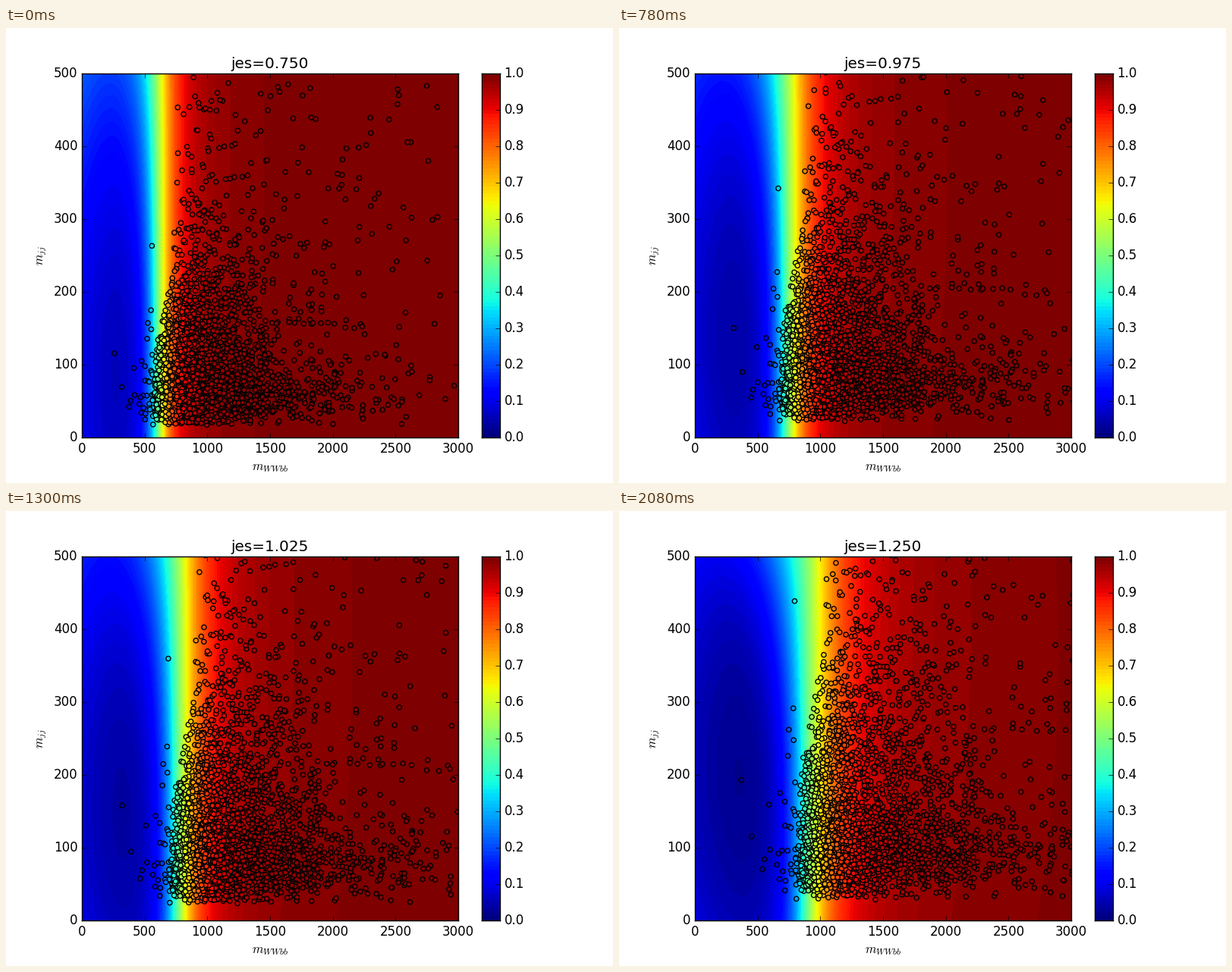
Recreate the animation shown at these times as a matplotlib script. Size 800 by 600 pixels, loop 2340 ms.

```python
import numpy as np
import matplotlib.pyplot as plt
from matplotlib.animation import FuncAnimation

plt.rcParams.update({
    "font.family": "DejaVu Sans", "font.size": 12,
    "mathtext.fontset": "cm", "text.hinting": "force_autohint",
    "axes.linewidth": 1.0, "axes.axisbelow": False,
    "axes.titlesize": 14.4, "axes.titlepad": 5, "axes.labelpad": 5,
    "ytick.alignment": "center",
})
for side in ("xtick", "ytick"):
    plt.rcParams.update({
        f"{side}.direction": "in", f"{side}.major.size": 4,
        f"{side}.major.width": 0.5, f"{side}.major.pad": 4,
    })

SCALES = [0.75, 0.9, 0.95, 0.975, 1.0, 1.025, 1.05, 1.1, 1.25]
X_MAX, Y_MAX, LEVELS = 3000, 500, 100


def make_events(rng):
    """Event masses at unit energy scale, as a mix of populations."""
    def beyond_edge(y, shape, spread):
        edge = 680 + 0.9 * np.clip(y - 120, 0, 230)
        return edge + rng.gamma(shape, spread, len(y))

    peak = rng.lognormal(np.log(82), 0.45, 1400)
    wide = 22 + rng.gamma(1.9, 62, 1300)
    tail = 160 + rng.exponential(190, 320)
    stray = rng.uniform(40, 650, 130)
    early = rng.lognormal(np.log(85), 0.45, 32)

    x = np.concatenate([
        beyond_edge(peak, 1.6, 390),
        beyond_edge(wide, 1.8, 235),
        beyond_edge(tail, 1.9, 235),
        rng.uniform(1600, 3700, len(stray)),
        690 - rng.exponential(75, len(early)),
    ])
    y = np.concatenate([peak, wide, tail, stray, early])
    order = rng.permutation(len(x))
    return x[order], np.maximum(y[order], 18 + 10 * rng.random(len(x)))


def response(x, y, jes):
    """Classifier output: a shallow bowl joined to a steep rise."""
    d = jes - 1
    height = y / Y_MAX
    x_low, y_low = 420 + 340 * d, 150 + 260 * d
    base = (0.032 - 0.09 * d
            + 0.045 * (np.minimum(x, x_low) / x_low - 1) ** 2
            + 0.7e-6 * (np.clip(y, 0, 600) - y_low) ** 2)
    u = (x - 765 - 590 * d) / 1000
    left = (12.5 / jes - 5 * height ** 2) * u
    width = (0.14 + 0.08 * height) * jes
    right = (1.6 + 0.2 * height - 0.4 * d) * np.arcsinh(u / width)
    rise = 1 / (1 + np.exp(-np.where(u < 0, left, right)))
    return np.clip(base + (1 - base) * rise, 0, 1)


def banded(values):
    return np.minimum(np.floor(values * LEVELS), LEVELS - 1) / (LEVELS - 1)


event_x, event_y = make_events(np.random.default_rng(12))
fixed_part = np.minimum(330, 0.3 * event_x)  # mass that does not scale
grid_x, grid_y = np.meshgrid((np.arange(496) + 0.5) * X_MAX / 496,
                             (np.arange(480) + 0.5) * Y_MAX / 480)

fig = plt.figure(figsize=(8, 6), dpi=100, facecolor="white")
ax = fig.add_axes([0.125, 0.1, 0.62, 0.8])
style = dict(cmap="jet", vmin=0, vmax=1, origin="lower",
             aspect="auto", interpolation="nearest")
surface = ax.imshow(np.zeros(grid_x.shape),
                    extent=(0, X_MAX, 0, Y_MAX), **style)
dots = ax.scatter(event_x, event_y, s=20, c=np.zeros(len(event_x)),
                  cmap="jet", vmin=0, vmax=1, edgecolors="black",
                  linewidths=1.0)
ax.set(xlim=(0, X_MAX), ylim=(0, Y_MAX),
       xticks=range(0, X_MAX + 1, 500), yticks=range(0, Y_MAX + 1, 100),
       xlabel="$m_{WWbb}$", ylabel="$m_{jj}$")
ax.tick_params(top=True, right=True)
title = ax.set_title("")

bar = fig.add_axes([0.78375, 0.1, 0.03, 0.8])
bar.imshow(np.linspace(0, 1, LEVELS)[:, None], extent=(0, 1, 0, 1), **style)
bar.set(xticks=[], yticks=np.linspace(0, 1, 11))
bar.yaxis.set_major_formatter("{x:.1f}")
bar.tick_params(axis="y", left=False, right=True,
                labelleft=False, labelright=True)


def update(index):
    jes = SCALES[index]
    x = fixed_part + (event_x - fixed_part) * jes
    y = event_y * jes
    surface.set_data(banded(response(grid_x, grid_y, jes)))
    dots.set_offsets(np.column_stack([x, y]))
    dots.set_array(response(x, y, jes))
    title.set_text(f"jes={jes:.3f}")
    return surface, dots, title


anim = FuncAnimation(fig, update, frames=len(SCALES), interval=260,
                     repeat=True, repeat_delay=0, blit=False)
plt.show()
```
